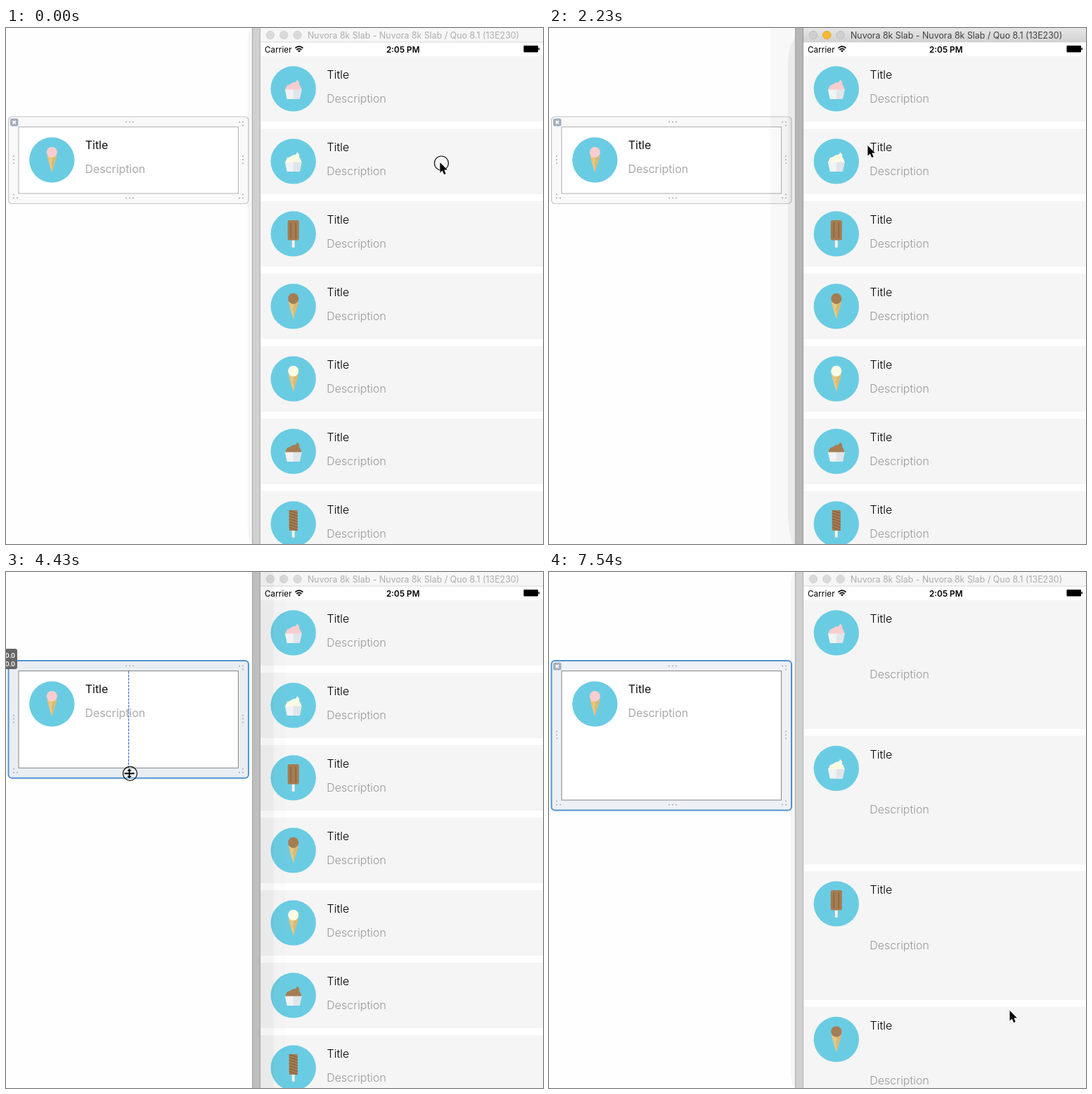
An HTML page that plays this animation: 764x733 px, repeating every 8 s.

```html
<!DOCTYPE html>
<html lang="en">
<head>
<meta charset="utf-8">
<title>Resizable list cell</title>
<style>
  html, body { margin: 0; width: 100%; height: 100%; overflow: hidden; background: #fefefe; }
  svg { display: block; width: 764px; height: 733px; }
  text { font-family: Inter, Roboto, sans-serif; }
</style>
</head>
<body>
<svg id="stage" viewBox="0 0 764 733" xmlns="http://www.w3.org/2000/svg">
  <defs>
    <clipPath id="screen"><rect x="362" y="40" width="402" height="693"/></clipPath>
    <linearGradient id="bar" x2="0" y2="1">
      <stop stop-color="#e6e6e6"/><stop offset="1" stop-color="#d2d2d2"/>
    </linearGradient>
  </defs>
  <rect width="764" height="733" fill="#fefefe"/>

  <g id="editor">
    <rect id="frame" x="3.5" y="126" width="341.5" rx="5"/>
    <rect id="cell" x="18" y="140.5" width="312.5" fill="#fff"/>
    <g id="sample"></g>
    <path id="dots" fill="none" stroke="#aeb2b6" stroke-width="2.2" stroke-linecap="round"/>
    <g id="close">
      <rect x="6" y="128.5" width="11.5" height="11" rx="2.5" fill="#a3afbd"/>
      <path d="M9.5 131.8l4.4 4.4m0-4.4l-4.4 4.4" stroke="#fff" stroke-width="1.7"/>
    </g>
    <g fill="none" stroke="#3e6ae6" stroke-width="1.2" stroke-dasharray="3.4 1.4">
      <path id="guideH" d="M18 187H330"/>
      <path id="guideV"/>
    </g>
    <g id="tag">
      <rect x="-40" y="109" width="56" height="29" rx="3" fill="#666"/>
      <g fill="#fff" font-size="9" font-weight="600" text-anchor="end">
        <text x="13" y="121.5">320.0</text>
        <text id="size" x="13" y="133.5"></text>
      </g>
    </g>
  </g>

  <g id="softShade"><path d="M350 0Q344 4 344 14V715Q345 728 350 733Z" opacity=".035"/></g>
  <g id="deepShade">
    <rect x="315.500" width="35" height="733" opacity=".025"/>
    <path d="M350 14Q340 26 340 52V690Q341 720 347 733H351V14Z" opacity=".05"/>
  </g>

  <rect id="gutter" x="350" width="12" height="733"/>
  <path id="gutterEdge" d="M350.500 0V733" fill="none"/>
  <path d="M361.500 0V733" stroke="#000" opacity=".16"/>

  <rect x="362" width="402" height="733" fill="#fff"/>
  <rect id="titleBar" x="362" width="402" height="20"/>
  <path d="M362 20H764" stroke="#c9c9c9" stroke-width=".7"/>
  <g id="lights" stroke-width=".8">
    <circle cx="376" cy="10" r="5.700"/><circle cx="395.300" cy="10" r="5.700"/><circle cx="414.600" cy="10" r="5.700"/>
  </g>
  <text id="caption" x="429" y="14.600" font-size="12.400">Nuvora 8k Slab - Nuvora 8k Slab / Quo 8.1 (13E230)</text>
  <text x="368" y="34.700" font-size="11.800">Carrier</text>
  <text x="541" y="34.700" font-size="11.800" font-weight="600">2:05 PM</text>
  <g fill="none" stroke="#000" stroke-width="1.700">
    <path d="M411.500 28.600Q417 23.500 422.500 28.600M413.500 31Q417 27.800 420.500 31"/>
  </g>
  <path d="M415 32.300Q417 30.700 419 32.300L417 34.600Z"/>
  <rect x="736.500" y="25" width="20.500" height="9.500" rx="1"/>
  <rect x="757.500" y="28" width="1.500" height="3.500" rx=".7"/>

  <g clip-path="url(#screen)">
    <g id="list"></g>
    <rect id="thumb" x="760" width="2.400" rx="1.200" fill="#808080"/>
  </g>
  <g id="rightShade">
    <rect x="362" width="18.500" height="733" opacity=".03"/>
    <rect x="362" width="35" height="733" opacity=".012"/>
  </g>

  <circle id="ring" r="10" fill="#fff" fill-opacity=".15" stroke="#111" stroke-width="1.200"/>
  <path id="arrow" d="M0 0V14.500L3.300 11.500L5.700 17L8.200 16L5.800 10.600H10.300Z" fill="#000" stroke="#fff" stroke-width="1" paint-order="stroke"/>
  <g id="resizer">
    <path id="resizeShape" d="M-7 -1H-.9V-3.500H-3.200L0 -7.200L3.200 -3.500H.9V-1H7V1H.9V3.500H3.200L0 7.200L-3.200 3.500H-.9V1H-7Z" fill="#000" stroke="#fff" stroke-width="1" paint-order="stroke"/>
  </g>
</svg>
<script>
const LOOP = 8000, FIRST = 290, STEP = 88.2;
const PINK = '#fbcdd0', CREAM = '#fdfbe4', BROWN = '#a67c52';
const $ = id => document.getElementById(id);
const set = (id, attrs) => { for (const k in attrs) $(id).setAttribute(k, attrs[k]); };
const show = (id, on) => set(id, { visibility: on ? 'visible' : 'hidden' });
const within = (t, a, b) => t >= a && t < b;

const cup = color => `
  <path d="M-12 .5H12L9 14.500H-9Z" fill="#f1f3f5"/><path d="M0 .5H12L9 14.500H0Z" fill="#dfe5e9"/>
  <path d="M-11.500 1L-9 -5Q-4 -6 -1 -9Q5 -9 5 -13Q10 -10 8 -6.500Q11 -4 11.500 1Z" fill="${color}"/>`;
const cone = color => `
  <path d="M-7 -6H7L0 18Z" fill="#eccb86"/><path d="M0 -6H7L0 18Z" fill="#deb970"/>
  <path d="M-5 0L2 -6M-3 7L6 -3M-6 -4L2 9" stroke="#d9b469" stroke-width=".6"/>
  <circle cy="-11" r="7.600" fill="${color}"/>`;
const stick = '<rect x="-2" y="7" width="4" height="12.500" rx="1.500" fill="#f4eee2"/>';
const pop = `${stick}
  <rect x="-8" y="-19.500" width="16" height="28.500" rx="2.500" fill="${BROWN}"/>
  <path d="M-3.500 -16V6M3.500 -16V6" stroke="#8d653e" stroke-width="1.600"/>`;
const twist = () => {
  let d = '';
  for (let y = -17; y < 9; y += 4) d += `M-6 ${y - 2}L6 ${y + 2}`;
  return `${stick}<rect x="-6" y="-19.500" width="12" height="29" rx="1" fill="${BROWN}"/>
    <path d="${d}" stroke="#8a6039" stroke-width="1.300"/>`;
};
const badge = (x, y, art) =>
  `<g transform="translate(${x} ${y})"><circle r="32.200" fill="#6acce3"/>${art}</g>`;

$('sample').innerHTML = badge(65.3, 187.5, cone(PINK)) + `
  <text x="112.800" y="172.300" font-size="15.900" fill="#111">Title</text>
  <text x="112.600" y="206.300" font-size="15.800" fill="#aaa">Description</text>`;

const arts = [cup(PINK), cup(CREAM), pop, cone(BROWN), cone(CREAM), cup(BROWN), twist(), cone(PINK)];
$('list').innerHTML = arts.map(art => `<g>
  <rect x="362" width="402" fill="#f5f5f5"/>${badge(408.8, 46.4, art)}
  <text x="456.500" y="32" font-size="16" font-weight="300" fill="#000">Title</text>
  <text class="note" x="456.300" font-size="16" font-weight="300" fill="#999">Description</text></g>`).join('');
const rows = [...$('list').children];

// Keys are [time, ...values]; values are linear between keys.
function track(keys, t) {
  let i = 0;
  while (i < keys.length - 1 && keys[i + 1][0] <= t) i++;
  const a = keys[i], b = keys[i + 1];
  if (!b || t <= a[0]) return a.slice(1);
  const f = (t - a[0]) / (b[0] - a[0]);
  return a.slice(1).map((v, n) => v + (b[n + 1] - v) * f);
}

const pointer = [
  [380, 617, 191], [819, 617, 141], [908, 617, 141], [1525, 617, 197], [1613, 617, 197],
  [2050, 461, 158], [2142, 461, 158], [2230, 453, 167], [2318, 451, 169], [2407, 451, 169],
  [3200, 172, 247], [6023, 176, 332], [6288, 547, 462], [6376, 547, 462], [6464, 594, 482]
];
const scrolling = [[380, 0], [819, -41], [908, -41], [1525, 8], [1613, 8], [1800, 2], [2050, 0]];
const growth = [[3994, 0], [4788, 78], [4876, 80], [5053, 83], [5320, 83], [5497, 89]];

function drawEditor(t, grow) {
  const active = t >= 3370, dragging = within(t, 3630, 5680);
  const bottom = 235 + grow, mid = 187 + grow / 2;
  set('frame', {
    height: 123.5 + grow,
    fill: active ? (dragging ? '#e9eef2' : '#eef1f5') : '#f9f9f9',
    stroke: active ? '#5295d3' : '#c6c6c6',
    'stroke-width': active ? 2 : 1.2
  });
  set('cell', { height: 94.5 + grow, stroke: active ? '#858585' : '#b0b0b0' });
  const points = [];
  for (const d of [-5, 0, 5]) {
    points.push([176 + d, 133.5], [176 + d, bottom + 6.5], [11, mid + d], [337, mid + d]);
  }
  for (const y of [133.5, bottom + 6.5]) points.push([332, y], [337, y]);
  points.push([337, 138.5], [337, bottom + 1.5], [11, bottom + 1.5], [11, bottom + 6.5], [16, bottom + 6.5]);
  set('dots', { d: points.map(p => `M${p}h.01`).join('') });
  set('guideV', { d: `M174.500 141V${bottom}` });
  show('guideH', dragging && grow < 3);
  show('guideV', dragging);
  show('tag', dragging);
  show('close', !dragging);
  $('size').textContent = (96 + Math.round(grow * 1.025)).toFixed(1);
}

function drawWindow(t) {
  const front = within(t, 290, 3370), behind = within(t, 3370, 7450);
  show('softShade', !front && !behind);
  show('deepShade', front);
  show('rightShade', behind);
  set('gutter', { fill: front ? '#b6b6b6' : behind ? '#bebebe' : '#d0d0d0' });
  set('gutterEdge', { stroke: front ? '#a2a2a2' : '#a9a9a9' });
  set('titleBar', { fill: front ? 'url(#bar)' : '#f6f6f6' });
  set('caption', { fill: front ? '#404040' : '#adadad' });
  [...$('lights').children].forEach((dot, i) => {
    const lit = front && i === 1;
    dot.setAttribute('fill', lit ? '#f6bb2e' : front ? '#cfcfcf' : '#dadada');
    dot.setAttribute('stroke', lit ? '#dca023' : front ? '#b9b9b9' : '#cdcdcd');
  });
}

function drawList(t, scroll) {
  const tall = t >= 7450, pitch = tall ? 192.5 : 103;
  rows.forEach((row, i) => {
    row.setAttribute('transform', `translate(0 ${40 + i * pitch + scroll})`);
    row.firstElementChild.setAttribute('height', tall ? 183 : 93);
    row.querySelector('.note').setAttribute('y', tall ? 110.5 : 66);
  });
  const fade = t < 470 ? 0 : Math.max(0, Math.min(1, (2050 - t) / 260));
  set('thumb', { y: 43 + Math.max(0, -scroll) * .33, height: 235 - Math.max(0, scroll), opacity: fade });
}

function drawCursor(t, q, grow) {
  const sizing = within(t, 3370, 6110);
  let [x, y] = track(pointer, q);
  if (t >= 7450) [x, y] = [655, 623];
  show('arrow', !sizing && !within(t, 6550, 7450));
  show('resizer', sizing);
  set('arrow', { transform: `translate(${x + .5} ${y})` });
  set('resizer', { transform: `translate(175.500 ${243 + grow})` });
  set('ring', sizing ? { cx: 176.5, cy: 243 + grow } : { cx: x + 2.5, cy: y + 1 });
  show('ring', t < 80 || within(t, 290, 1615) || within(t, 3370, 3460) || within(t, 3630, 5680));
}

function draw(t) {
  const q = FIRST + Math.floor((t - FIRST) / STEP + .1) * STEP;
  const [grow] = track(growth, q), [scroll] = track(scrolling, q);
  drawEditor(t, grow);
  drawWindow(t);
  drawList(t, scroll);
  drawCursor(t, q, grow);
}

const start = performance.now();
function tick() {
  draw((performance.now() - start) % LOOP);
  requestAnimationFrame(tick);
}
tick();
</script>
</body>
</html>
```
